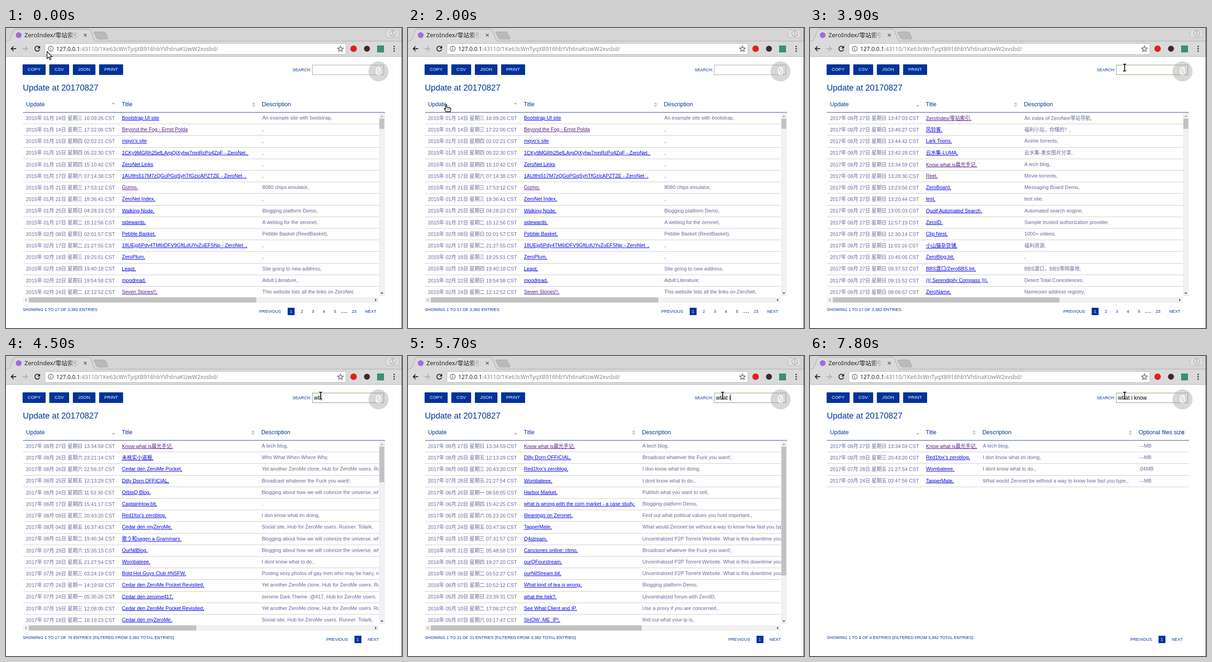
Write an HTML page that moves like this. It is 859 px wide and 652 px high and loops after 8000 ms.

```html
<!DOCTYPE html>
<html lang="zh">
<head>
<meta charset="utf-8">
<style>
html, body { margin: 0; width: 100%; height: 100%; overflow: hidden; background: #fff }
svg { display: block }
text { font-family: 'Liberation Sans', 'Noto Sans CJK SC', sans-serif; white-space: pre }
.ui { font-family: 'Noto Sans', 'Noto Sans CJK SC', sans-serif }
.serif { font-family: 'Liberation Serif', serif }
.mono { font-family: 'Noto Sans Mono', monospace }
.link { text-decoration: underline }
</style>
</head>
<body>
<svg id="stage" width="859" height="652" viewBox="0 0 859 652"></svg>
<script>
// One row per line: date, weekday and time | title (* = visited) | description
const parse = s => s.trim().split('\n').map(line => {
  const [stamp, title, desc] = line.split('|');
  const [, y, mo, d, week, h, mi, s] = stamp.match(/(..)(..)(..)(.)(..)(..)(..)/);
  return {
    date: `20${y}年 ${mo}月 ${d}日 星期${week} ${h}:${mi}:${s} CST`,
    title: title.replace('*', ''), visited: title[0] == '*', desc
  };
});

const oldest = parse(`
150114三160926|Bootstrap UI site|An example site with bootstrap,
150114三172206|*Beyond the Fog - Ernst Polda|,
150115四020221|mqvo's site|,
150115四052230|1CKy9MGRh25efLArpQjXyhw7mnRcPo4ZqF - ZeroNet_|,
150115四151042|ZeroNet Links|,
150117六071438|1AUtfrs517M7zQGoPGqSyhTfGzicAPZTZE - ZeroNet_,|,
150121三175312|*Gizmo,|8080 chips emulator,
150121三193641|ZeroNet Index,|,
150125日042823|Walking Node,|Blogging platform Demo,
150127二151256|sidewards,|A weblog for the zeronet,
150208日020157|Pebble Basket,|Pebble Basket (ReedBasket),
150217二212755|18UEjq5Pdy4TM6tDFV9GftLdUYvZuEFSNp - ZeroNet_,|,
150218三192551|ZeroPlum,|,
150219四194018|Leapt,|Site going to new address,
150222日195458|moodread,|Adult Literature,
150224二121252|*Seven Stones!!,|This website lists all the links on ZeroNet,`);

const newest = parse(`
170827日134703|*ZeroIndex/零站索引,|An index of ZeroNet/零站导航,
170827日134627|风铃客,|福利小站，你懂的！,
170827日134442|Lark Toons,|Anime torrents,
170827日134228|云水集-LUMA,|云水集-美女图片分享,
170827日133459|*Know what is晨光手记,|A tech blog,
170827日132830|*Reel,|Movie torrents,
170827日132356|ZeroBoard,|Messaging Board Demo,
170827日132044|test,|test site,
170827日130503|Quolf Automated Search,|Automated search engine,
170827日125719|ZeroID,|Sample trusted authorization provider,
170827日123014|Clip Nest,|1000+ videos,
170827日110316|小山猫杂货铺,|福利资源,
170827日104505|ZeroBlog.bit,|,
170827日093753|BBS渡口/ZeroBBS.bit,|BBS渡口，BBS零网基地,
170827日091552|((( Serendipity Compass ))),|Detect Total Coincidences,
170827日080657|ZeroName,|Namecoin address registry,`);

const matches = parse(`
170827日133459|*Know what is晨光手记,|A tech blog,
170826六232114|未核实小道报,|Who What When Where Why,
170826六225637|Cedar den ZeroMe Pocket,|Yet another ZeroMe clone, Hub for ZeroMe users. Runner: Tolark,
170825五121329|Dilly Dorn OFFICIAL,|Broadcast whatever the Fuck you want!,
170824四115330|OrbisQ Blog,|Blogging about how we will colonize the universe, where
170817四154117|CaptainHow.bit,|,
170809三204320|Red1fox's zeroblog,|I don know what im doing,
170804五163743|Cedar den myZeroMe,|Social site, Hub for ZeroMe users. Runner: Tolark,
170801二194634|歌う和sagen a Grammars,|Blogging about how we will colonize the universe, where
170729六153513|OurNilBlog,|Blogging about how we will colonize the universe, where
170728五212754|Wombateee,|I dont know what to do.,
170726三032419|Bold Hot Guys Club #NSFW,|Posting sexy photos of gay men who may be hairy, not
170724一141958|Cedar den ZeroMe Pocket Revisited,|Yet another ZeroMe clone, Hub for ZeroMe users. Runner: Tolark,
170724一053526|Cedar den zerome417,|zerome Dark Theme :@417, Hub for ZeroMe users.
170719三120805|Cedar den ZeroMe Pocket Revisited,|Yet another ZeroMe clone, Hub for ZeroMe users. Runner: Tolark,
170718二181923|Cedar den myZeroMe,|Social site, Hub for ZeroMe users. Runner: Tolark,
170626一085805|Harbor Market,|Publish what you want to sell,
170622四154225|what is wrong with the corn market - a case study,|Blogging platform Demo,
170610六052326|6leanings on Zeronet,|Find out what political values you hold important.,
170324五034756|TapperMate,|What would Zeronet be without a way to know how fast you type.,
170215三073157|Q4stream,|Uncentralized P2P Torrent Website. What is this downtime you are
160921三054858|Canciones online: ritmo,|Broadcast whatever the Fuck you want!,
160915四192720|ourQFourstream,|Uncentralized P2P Torrent Website. What is this downtime you are
160906二035227|ourNilStream.bit,|Uncentralized P2P Torrent Website. What is this downtime you are
160607二105212|What kind of tea is wrong,|Blogging platform Demo,
160529日233931|what the hek?,|Uncentralized forum with ZeroID,
160510二170827|See What Client and IP,|Use a proxy if you are concerned.,
160507六031747|SHOW_ME_IP!,|find out what your ip is,`);

const typing = [[4500, 'wh'], [4600, 'wha'], [4800, 'what'], [5100, 'what '], [5700, 'what i'],
  [6000, 'what i '], [6200, 'what i k'], [6600, 'what i kn'], [6800, 'what i kno'], [7200, 'what i know']];

// time, x, y of the pointer
const track = [[0, 89, 51], [500, 67, 44], [1300, 67, 44], [1700, 93, 158], [1800, 92, 171], [2000, 83, 167],
  [2500, 83, 167], [2600, 160, 152], [2800, 540, 105], [2900, 656, 91], [3000, 676, 88], [3100, 682.5, 86], [8000, 682.5, 86]];

const BLUE = '#039', SOFT = '#669';
const pen = document.createElement('canvas').getContext('2d');
pen.font = "12px 'Liberation Sans', sans-serif";

const text = (x, y, s, size, fill, more = '') =>
  `<text x="${x}" y="${y}" font-size="${size}" fill="${fill}" ${more}>${s}</text>`;
const rect = (x, y, w, h, fill, more = '') =>
  `<rect x="${x}" y="${y}" width="${w}" height="${h}" fill="${fill}" ${more}/>`;
const path = (d, fill, stroke = 'none', width = 1, more = '') =>
  `<path d="${d}" fill="${fill}" stroke="${stroke}" stroke-width="${width}" ${more}/>`;
const disc = (x, y, r, fill, more = '') => `<circle cx="${x}" cy="${y}" r="${r}" fill="${fill}" ${more}/>`;
const up = (x, y, fill, r = 4) => path(`M${x - r} ${y + r}h${2 * r}l${-r} ${-r}z`, fill);
const down = (x, y, fill, r = 4) => path(`M${x - r} ${y}h${2 * r}l${-r} ${r}z`, fill);

function browser(t) {
  const loading = t >= 600 && t < 1200;
  return rect(0, 0, 859, 62, '#d6d6d6')
    + path('M0 28.5H3Q7 28 9 24L16 6Q18 2.5 21 2.5H177Q181 2.5 183 6L190 24Q192 28.5 196 28.5H859V62H0Z', '#dadada')
    + path('M0 28.5H3Q7 28 9 24L16 6Q18 2.5 21 2.5H177Q181 2.5 183 6L190 24Q192 28.5 196 28.5H859', 'none', '#a9a9a9')
    + path('M193 8.5H212Q215 8.5 216 11L221 22Q221 24 219 24H201Q198 24 197 22L191 11Q190 8.5 193 8.5Z', '#bababa', '#a2a2a2')
    + (loading
      ? path('M21.5 19A7 7 0 0 1 28 9.5', 'none', '#858585', 1.6, `transform="rotate(${(t - 1000) * .36} 28 15.5)"`)
      : disc(27.5, 15.5, 6.3, '#a566e6'))
    + `<defs><linearGradient id="fade"><stop offset=".78" stop-color="#222"/><stop offset="1" stop-color="#222" stop-opacity="0"/></linearGradient>
       <clipPath id="tab"><path d="M38 4H157V26H38Z"/></clipPath></defs>`
    + `<g clip-path="url(#tab)">${text(40, 20, 'ZeroIndex/零站索引', 13, 'url(#fade)', 'class="ui"')}</g>`
    + path('M169 12.5l6 6m0-6l-6 6', 'none', '#555', 1.3)
    + rect(824.5, 4.5, 28, 16, '#dedede', 'rx="2" stroke="#bcbcbc"')
    + disc(839, 12, 6, '#f4f4f4', 'stroke="#888"') + disc(839, 10.3, 2, 'none', 'stroke="#888"')
    + path('M835 16Q839 11.5 843 16', 'none', '#888')
    + path('M22 45H11.5M16.5 39.8L11.3 45l5.2 5.2', 'none', '#222', 1.8)
    + path('M36 45H46.5M41.5 39.8L46.7 45l-5.2 5.2', 'none', '#b0b0b0', 1.8)
    + (loading ? path('M63 40l10 10m0-10l-10 10', 'none', '#222', 1.8)
      : path('M72.3 42A5.3 5.3 0 1 0 73 46.5', 'none', '#222', 1.8) + path('M74 38.5V44.5H68Z', '#222'))
    + rect(84.5, 33.5, 653, 24, '#fff', 'rx="2" stroke="#b6b6b6"')
    + disc(97, 45, 5.4, 'none', 'stroke="#555" stroke-width="1.2"') + path('M97 44v4M97 41.6v1.4', 'none', '#555', 1.3)
    + text(109, 49.5, '127.0.0.1<tspan fill="#888">:43110/1Ke63cWnTyqXB916hbYVh6naKUwW2xvsbd/</tspan>', 12.2, '#222', 'class="ui"')
    + path('M725.5 39l1.8 4.2 4.4.4-3.4 2.9 1.1 4.4-3.9-2.4-3.9 2.4 1.1-4.4-3.4-2.9 4.4-.4Z', 'none', '#555', 1.2)
    + disc(754, 45, 7, '#e21f1f') + disc(783, 45, 6.5, '#3c2b2b') + rect(805, 38, 15, 15, '#3c8f74')
    + [40, 45, 50].map(y => disc(842, y, 1.6, '#333')).join('')
    + rect(0, 61.5, 859, 1, '#b4b4b4');
}

function bars(v) {
  let s = '';
  if (v.vEnd) s += rect(809, 185, 13, 398, '#f1f1f1') + rect(810, 197, 10.5, v.vEnd - 197, '#c1c1c1')
    + up(815.3, 190, '#a3a3a3', 3.3) + down(815.3, 575, '#505050', 3.3);
  if (v.hEnd) s += rect(37, 585, v.right - 37, 12, '#f1f1f1') + rect(49.5, 585.5, v.hEnd - 49.5, 11, '#c1c1c1')
    + path('M41 591l3.3-3.3v6.6z', '#a3a3a3') + path(`M${v.right - 5} 591l-3.3-3.3v6.6z`, '#505050');
  return s;
}

// Cells holding Chinese text sit slightly lower in their line
const cell = (x, y, s, fill, more) =>
  text(x, (y + (/[\u3000-\uffff]/.test(s) ? .8 : 0)).toFixed(1), s, 10.9, fill, more);

function table(v) {
  const head = (x, s) => text(x, 170, s, 12.6, BLUE);
  const both = x => up(x, 161.5, '#c0c3d8') + down(x, 167.5, '#c0c3d8');
  let s = head(43.5, 'Update') + (v.asc ? up(233, 161.5, '#b9bcd0') : down(233, 167.5, '#b9bcd0'))
    + head(251, 'Title') + both(v.x - 18) + head(v.x, 'Description');
  if (v.size) s += both(695) + both(810) + head(713, 'Optional files size');
  s += rect(37, 182.7, 785, 1.5, '#6678b2')
    + `<clipPath id="body"><path d="M37 184H${v.right}V584H37Z"/></clipPath><g clip-path="url(#body)">`;
  v.rows.slice(0, 16).forEach((r, i) => {
    const y = 199 + i * 25.2;
    s += cell(43.3, y, r.date, SOFT)
      + cell(251.5, y, r.title, r.visited ? '#551a8b' : '#00e', 'class="link"')
      + cell(v.x + 1, y, r.desc, SOFT)
      + rect(37, Math.round(y + 9.2), 785, 1, '#ccc');
    if (v.size) s += cell(713.5, y, /^I dont/.test(r.desc) ? '.04MB' : '---MB', SOFT);
  });
  return s + '</g>' + bars(v);
}

function view(t, query) {
  if (!query) {
    const asc = t < 2300;
    return { asc, rows: asc ? oldest : newest, x: asc ? 555 : 464, right: 809, vEnd: 219, hEnd: asc ? 543 : 541, last: 17, total: '3,382' };
  }
  const words = query.trim().split(' ');
  const rows = matches.filter(r => query.length < 3 ||
    words.every(w => (r.title + r.desc).toLowerCase().includes(w)));
  if (/kn/.test(query)) return { rows, x: 374, right: 822, size: true, last: rows.length, total: rows.length };
  if (/k/.test(query)) return { rows, x: 507, right: 822, hEnd: 517, last: rows.length, total: rows.length };
  const total = query == 'wh' ? 76 : words[1] ? 21 : 27;
  return { rows, x: total == 76 ? 553.7 : 507.5, right: 809, vEnd: 197 + 5880 / total, hEnd: total == 76 ? 413 : 507, last: total == 21 ? 21 : 17, total };
}

function page(t) {
  if (t >= 700 && t < 1200) return t < 900 ? '' : text(8, 82, 'Update at', 14.5, '#000', 'class="serif"')
    + text(7.5, 99, '20170827', 14.5, '#000', 'class="serif"');
  const query = typing.reduce((q, [at, s]) => t >= at ? s : q, '');
  const v = view(t, query), focus = t >= 3300;
  const caret = focus && !(t >= 3900 && t < 4500) && t < 7800;
  const small = (x, s, fill = BLUE) => text(x, 619.3, s, 9.15, fill);
  let s = [[36, 50, 'COPY'], [94, 43, 'CSV'], [145, 49, 'JSON'], [202, 52, 'PRINT']].map(([x, w, name]) =>
    rect(x, 79, w, 23, BLUE, 'rx="1"') + text(x + w / 2, 93.4, name, 9.9, '#fff', 'text-anchor="middle"')).join('');
  s += text(621.7, 94, 'SEARCH:', 9, BLUE)
    + rect(664.5, 80.5, 155, 21, '#fff', `stroke="${focus ? '#83a061' : '#a9a9a9'}"`)
    + text(668, 94.5, query, 12, '#000');
  if (caret) s += rect(668 + pen.measureText(query).width, 83, 1, 14, '#000');
  s += text(36.5, 136, 'Update at 20170827', 18.1, BLUE) + table(v)
    + text(36.5, 615, `SHOWING 1 TO ${v.last} OF ${v.total} ENTRIES${query ? ' (FILTERED FROM 3,382 TOTAL ENTRIES)' : ''}`, 9.1, BLUE);
  if (query) s += small(694.7, 'PREVIOUS') + rect(756, 608, 15, 16, BLUE) + small(760.5, '1', '#fff') + small(784.5, 'NEXT');
  else s += small(549.5, 'PREVIOUS') + rect(611, 608, 15, 16, BLUE) + small(615.8, '1', '#fff')
    + [2, 3, 4, 5].map(n => small(591.2 + n * 24, n)).join('')
    + [729, 733.5, 738].map(x => rect(x - .8, 617.5, 1.6, 1.6, '#222')).join('')
    + small(750, '23') + small(779, 'NEXT');
  return s;
}

function pointer(t) {
  const i = track.findIndex(p => p[0] > t), a = track[i - 1], b = track[i];
  const k = (t - a[0]) / (b[0] - a[0]);
  const beam = 'M-3-7.5Q0-7.5 0-6V6Q0 7.5-3 7.5M3-7.5Q0-7.5 0-6M0 6Q0 7.5 3 7.5';
  const shape = t >= 3000 ? path(beam, 'none', '#fff', 3.6) + path(beam, 'none', '#000', 1.8)
    : t >= 1900 && t < 2600
      ? path('M-1.3 1Q0-1.5 1.3 1V5.5L7 6.5Q10 7 10 10L8.5 15H-.5L-4 9.5Q-4.5 7.5-2.5 7.8L-1.3 9Z', '#fff', '#000', 1.3) + path('M3 8.5v2M6 8.5v2', 'none', '#000')
      : path('M0 0V15.5L3.6 12.3 6.2 18 8.8 16.8 6.3 11.3H11Z', '#fff', '#000', 1.3);
  return `<g transform="translate(${a[1] + (b[1] - a[1]) * k} ${a[2] + (b[2] - a[2]) * k})">${shape}</g>`;
}

const stage = document.getElementById('stage');
let shown = -1;
function tick(now) {
  const t = Math.floor(now % 8000 / 100) * 100;
  if (t != shown) {
    shown = t;
    stage.innerHTML = rect(0, 0, 859, 652, '#fff') + page(t)
      + disc(808, 94.3, 21.8, '#a0a0a0', 'fill-opacity=".42"')
      + text(808, 102, '0', 23, '#fff', 'class="mono" text-anchor="middle"')
      + browser(t) + rect(858, 0, 1, 652, '#444') + pointer(t);
  }
  requestAnimationFrame(tick);
}
tick(performance.now());
</script>
</body>
</html>
```
